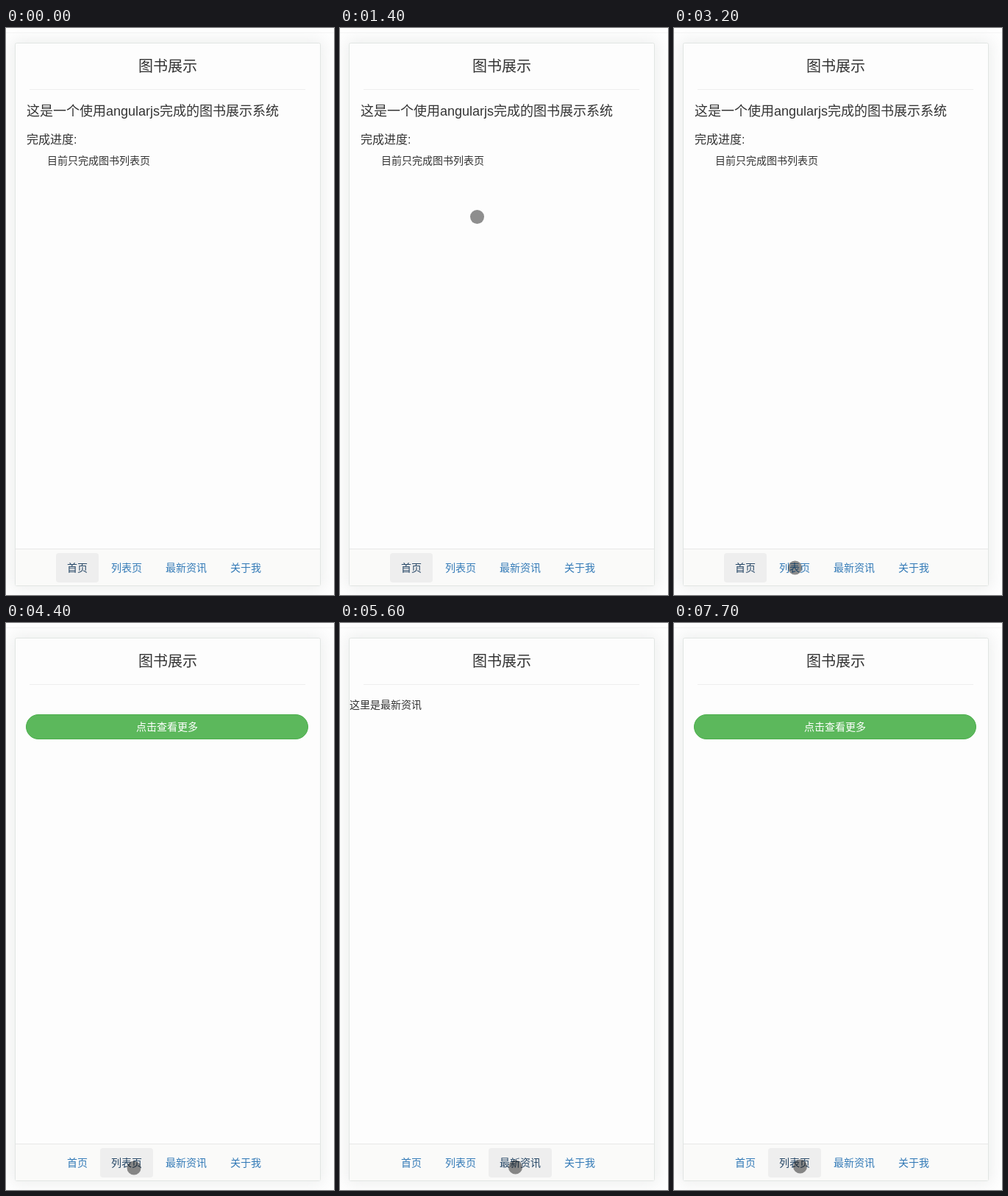
Write an HTML page that moves like this. It is 446 by 770 pixels and loops after 8000 ms.

```html
<!DOCTYPE html>
<html lang="zh-CN">
<head>
<meta charset="utf-8">
<title>图书展示</title>
<style>
  html, body { margin: 0; width: 100%; height: 100%; overflow: hidden; background: #fff; }
  svg { display: block; width: 100%; height: 100%; }
  text { font-family: "Liberation Sans", "Noto Sans CJK SC", "Noto Sans CJK", sans-serif; white-space: pre; }
</style>
</head>
<body>
<svg id="stage" viewBox="0 0 446 770" xmlns="http://www.w3.org/2000/svg">
  <defs>
    <filter id="soft" x="-10%" y="-10%" width="120%" height="120%"><feGaussianBlur stdDeviation="11"/></filter>
  </defs>
</svg>
<script>
const LOOP = 8000, STEP = 100;
const stage = document.getElementById("stage");

function add(parent, tag, attrs, content) {
  const node = document.createElementNS("http://www.w3.org/2000/svg", tag);
  for (const key in attrs) node.setAttribute(key, attrs[key]);
  if (content) node.textContent = content;
  parent.appendChild(node);
  return node;
}
const box = (parent, x, y, width, height, attrs) =>
  add(parent, "rect", { x, y, width, height, ...attrs });
const line = (parent, x1, x2, y, stroke) =>
  add(parent, "line", { x1, x2, y1: y, y2: y, stroke });
const label = (parent, x, y, size, fill, content, anchor = "start") =>
  add(parent, "text", {
    x, y, fill, "font-size": size, "text-anchor": anchor, "font-weight": size > 14 ? 300 : 400
  }, content);
const group = () => add(stage, "g", {});

// Card
line(stage, 0, 446, 6.5, "#f6f6f6");
box(stage, 8, 16, 424, 746, { fill: "#6b7570", opacity: 0.12, filter: "url(#soft)" });
box(stage, 12.5, 20.5, 415, 737, { fill: "#fdfdfd", stroke: "#e1e5e3", rx: 2 });
label(stage, 220, 59, 20, "#333", "图书展示", "middle");
line(stage, 32, 407, 83.5, "#eee");

// Pages
const pages = { home: group(), loading: group(), list: group(), news: group(), about: group() };

label(pages.home, 28, 119, 18, "#333", "这是一个使用angularjs完成的图书展示系统");
label(pages.home, 28, 157, 16, "#333", "完成进度:");
label(pages.home, 56, 185, 14, "#333", "目前只完成图书列表页");

box(pages.loading, 27.5, 124.5, 383, 33, { rx: 16.5, fill: "#5cb85c", stroke: "#4cae4c" });
label(pages.loading, 219, 146, 14, "#fff", "点击查看更多", "middle");

label(pages.news, 13, 116, 14, "#333", "这里是最新资讯");
label(pages.about, 13, 116, 14, "#333", "这里是关于我");

const books = [
  ["云朵乘凉",
    "冬天的夜晚，寒风嗖嗖的吹，月亮也冷得受不了啦!",
    "真想躲到哪个暖和的地方去暖暖呀! 突然，他看见不远的",
    "地方有个小烟囱。快去那儿烤烤火吧!月亮一下趴..."],
  ["雨靴游远了",
    "学校开展了一场足球比赛，一班和二班的孩子们都非",
    "常热情的参加了。比赛正在进行中。 乐乐!加油!乐乐，加",
    "油!乐乐!加油! 一班那个累的满头大汗的小胖子..."],
  ["小河狸陪伴长尾鹤修风筝",
    "有一天，小河狸正在外面散步，走啊走的，来到了南",
    "瓜村的天梯旁边。这个时候，小河狸看到天梯上正好有一",
    "个龙爬下来。 这是个什么龙呢?看起来好像没..."],
  ["爱困的熊墩子",
    "熊墩子从小就好忘性，总是忘这忘那的，于是，他把",
    "要做的事情全写在本子上。不然，就会忘得一干二净。",
    "一天，公鸡阿丘翻开墩子挂在门后的记事本，上..."],
  ["收藏微风",
    "小兔米多卡期末考试考了个好成绩，爸爸为了奖励",
    "他，给他买了一件他一直都想要的遥控小汽车。米多卡高",
    "兴得不得了。拍手叫好。 这个小汽车真好玩儿..."],
  ["吹口琴的圆滚羊"]
];
const ITEM_HEIGHT = 117;
box(pages.list, 28.5, 104.5, 383, 640, { rx: 4, fill: "#fdfdfd", stroke: "#ddd" });
books.forEach(([title, ...lines], i) => {
  const top = 104 + i * ITEM_HEIGHT;
  if (i) line(pages.list, 28, 412, top + 0.5, "#ddd");
  label(pages.list, 44, top + 26, 16, "#5f9ea0", title);
  lines.forEach((content, row) =>
    label(pages.list, row ? 44 : 72, top + 47 + row * 18, 14, "#6495ed", content));
  if (lines.length) label(pages.list, 396, top + 102, 14, "#555", "点击进入....", "end");
});

// Bottom navigation: each pill is as wide as its text plus padding
box(stage, 13, 707, 414, 50, { fill: "#fafaf9" });
line(stage, 13, 427, 707.5, "#e7e7e7");
let pillX = 68;
const tabs = ["首页", "列表页", "最新资讯", "关于我"].map(name => {
  const x = pillX, width = name.length * 14 + 30;
  pillX += width + 2;
  return {
    pill: box(stage, x, 713, width, 40, { rx: 4, fill: "#eee" }),
    text: label(stage, x + 15, 738, 14, "#337ab7", name)
  };
});

const views = [
  { time: 0, page: "home", tab: 0 },
  { time: 4400, page: "loading", tab: 1 },
  { time: 4700, page: "list", tab: 1 },
  { time: 5300, page: "news", tab: 2 },
  { time: 6400, page: "about", tab: 3 },
  { time: 7700, page: "loading", tab: 1 }
];

// Pointer route: moves and pauses follow one another
const pointer = add(stage, "circle", { r: 9.5, fill: "#000", "fill-opacity": 0.44 });
const route = [{ time: 200, x: 285, y: 301 }];
const move = (duration, x, y) => route.push({ time: route.at(-1).time + duration, x, y });
const pause = duration => move(duration, route.at(-1).x, route.at(-1).y);

// Wander down the page
move(200, 82, 312);
move(100, 115, 152);
move(200, 129, 131);
move(300, 118, 146);
move(400, 186.5, 256.5);
move(100, 97, 369);
move(100, 126, 483);
move(100, 97, 638);
move(200, 76, 724);
move(100, 99, 737);
// Visit the tabs
pause(300);
move(400, 166, 731);
pause(100);
move(100, 164.5, 733);
pause(300);
move(200, 101, 738);
pause(300);
move(500, 174, 740);
pause(400);
move(300, 238.5, 739);
pause(700);
move(600, 327, 738);
pause(600);
move(400, 171.5, 738);
pause(800);

function pointerAt(t) {
  const next = route.findIndex(point => point.time > t);
  if (next < 1) return null;
  const a = route[next - 1], b = route[next];
  const p = (t - a.time) / (b.time - a.time);
  return { x: a.x + (b.x - a.x) * p, y: a.y + (b.y - a.y) * p };
}

function render(t) {
  const { page, tab } = views.findLast(view => view.time <= t);
  for (const name in pages) pages[name].style.display = name === page ? "" : "none";
  tabs.forEach(({ pill, text }, i) => {
    pill.style.display = i === tab ? "" : "none";
    text.setAttribute("fill", i === tab ? "#264766" : "#337ab7");
  });

  // The pointer is redrawn only once per step
  const spot = pointerAt(Math.floor(t / STEP) * STEP);
  pointer.style.display = spot ? "" : "none";
  if (spot) {
    pointer.setAttribute("cx", spot.x);
    pointer.setAttribute("cy", spot.y);
  }
}

const begin = performance.now();
function tick() {
  render((performance.now() - begin) % LOOP);
  requestAnimationFrame(tick);
}
tick();
</script>
</body>
</html>
```
